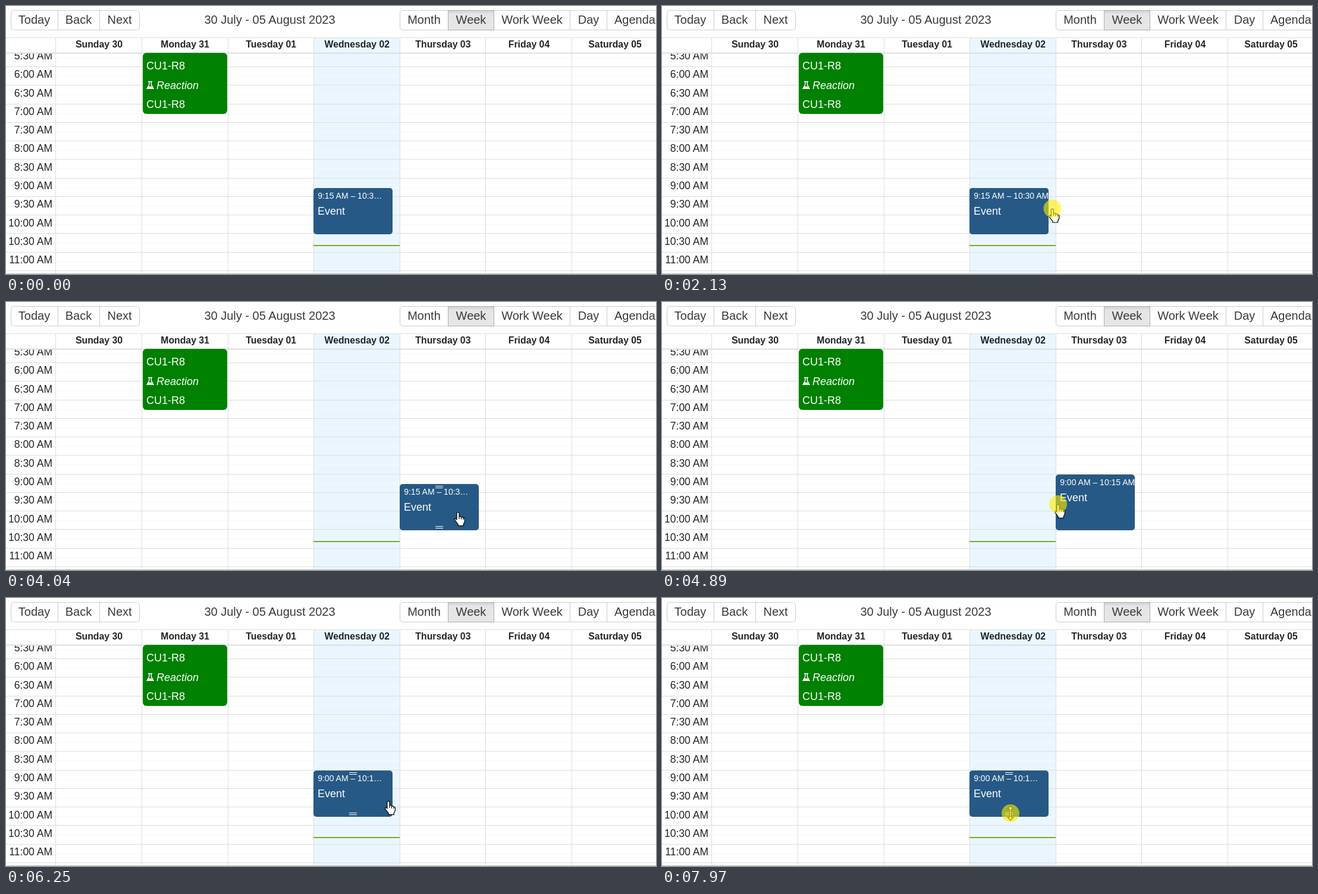
Animation, 1093 px wide and 452 px high, one loop 8 s. Source, as an HTML page:

```html
<!DOCTYPE html>
<html lang="en">
<head>
<meta charset="utf-8">
<title>Week calendar</title>
<style>
  html, body { margin: 0; width: 100%; height: 100%; overflow: hidden; background: #fff; }
  svg { display: block; }
  text { font-family: "Liberation Sans", Arial, sans-serif; white-space: pre; }
  .tool { font-size: 20px; fill: #373a3c; text-anchor: middle; }
  .head { font-size: 15.8px; font-weight: bold; fill: #212529; text-anchor: middle; }
  .hour { font-size: 17.5px; fill: #212529; text-anchor: end; }
  .title { font-size: 18px; fill: #fff; }
  .time { font-size: 14px; fill: #fff; }
  .cursor path { fill: #fff; stroke: #000; stroke-width: 1.2; stroke-linejoin: round; }
</style>
</head>
<body>
<svg id="stage" width="1093" height="452" viewBox="0 0 1093 452">
  <g id="grid"></g>
  <g id="header"></g>
  <g id="toolbar"></g>

  <g>
    <rect x="230" y="79" width="142" height="103" rx="6" fill="#008000"/>
    <text class="title" x="236" y="107">CU1-R8</text>
    <path d="M239 127.5h7M240.7 128v4.5l-3.7 6.7h11l-3.7-6.7v-4.5" fill="none" stroke="#fff" stroke-width="1.4"/>
    <path d="M239.3 135.5h6.4l2.3 4h-11z" fill="#fff"/>
    <text class="title" x="253" y="140" font-style="italic">Reaction</text>
    <text class="title" x="236" y="172">CU1-R8</text>
  </g>

  <svg id="booked" class="event" width="133" height="78"></svg>
  <svg id="preview" class="event" width="133" height="78"></svg>

  <g id="pointer" class="cursor">
    <g id="arrow"><path d="M0 0V17L4 13.5L6.5 19.5L9 18.5L6.5 12.5H12Z"/></g>
    <g id="hand">
      <path d="M-2 2.5Q-2 .6 0 .6Q2 .6 2 2.5V8Q4.8 7 5.5 9.2Q8.2 8 9 10.4Q11.4 9.6 11.4 12.5V16.5L9.3 20.5V23.4H.3V21L-5 14.2Q-6.2 11.3 -3.8 11.4L-2 13.2Z"/>
      <path d="M2 8V12M5.5 9.2V12.8M9 10.4V13.2"/>
    </g>
    <g id="resize"><path d="M0 -12L5 -7H1.3V7H5L0 12L-5 7H-1.3V-7H-5Z"/></g>
    <circle id="press" r="15" fill="#ffee00" fill-opacity=".6"/>
  </g>
</svg>
<script>
const LOOP = 8000;
const $ = id => document.getElementById(id);
const columnX = i => Math.round(83.3 + 144.6 * i);
const rect = (x, y, w, h, fill, extra = '') =>
  `<rect x="${x}" y="${y}" width="${w}" height="${h}" fill="${fill}" ${extra}/>`;
const text = (cls, x, y, s) => `<text class="${cls}" x="${x}" y="${y}">${s}</text>`;

function drawGrid() {
  let out = rect(518, 80, 144, 372, '#eaf6ff');
  for (let i = -1; i < 12; i++) {
    const y = Math.round(102 + 31.27 * i);
    out += rect(84, y + 16, 1009, 1, '#f7f7f7') + rect(0, y, 1093, 1, '#ddd');
    const minutes = 360 + 30 * i, hour = Math.floor(minutes / 60);
    if (i < 11) out += text('hour', 78, 121.2 + 31.3 * i, `${hour}:${minutes % 60 ? '30' : '00'} AM`);
  }
  $('grid').innerHTML = out;
}

function drawHeader() {
  const days = ['Sunday 30', 'Monday 31', 'Tuesday 01', 'Wednesday 02', 'Thursday 03', 'Friday 04', 'Saturday 05'];
  let out = rect(0, 0, 1093, 79, '#fff') + rect(518, 54, 144, 25, '#eaf6ff');
  days.forEach((day, i) => {
    out += rect(columnX(i), 54, 1, 398, '#ddd') + text('head', 156.5 + 144.6 * i, 70, day);
  });
  out += rect(0, 53, 1093, 1, '#ddd') + rect(0, 78.5, 1093, 2, '#ddd');
  out += rect(517, 403, 145, 2, '#74ad31') + rect(0, 451, 1093, 1, '#bbb');
  $('header').innerHTML = out;
}

function drawToolbar() {
  const frame = (x, w) => rect(x + .5, 7.5, w, 33, '#fff', 'rx="5" stroke="#ccc"');
  let out = `<linearGradient id="inset" x2="0" y2="1">
    <stop stop-color="#d0d0d0"/><stop offset=".2" stop-color="#e6e6e6"/></linearGradient>`;
  out += frame(8, 216) + frame(662, 450);
  out += [87, 157, 948, 1010].map(x => rect(x, 8, 1, 32, '#ccc')).join('');
  out += rect(743.5, 7.5, 77, 33, 'url(#inset)', 'stroke="#adadad"');
  const labels = { Today: 47.5, Back: 122, Next: 191, '30 July - 05 August 2023': 443.5, Month: 703,
    Week: 782, 'Work Week': 884.5, Day: 979.5, Agenda: 1057.5 };
  for (const [label, x] of Object.entries(labels)) out += text('tool', x, 30, label);
  $('toolbar').innerHTML = out;
}

function drawEvents() {
  const grip = y => rect(60, y, 13, 1, '#fff') + rect(60, y + 3, 13, 1, '#fff');
  document.querySelectorAll('.event').forEach(el => {
    el.innerHTML = rect(0, 0, 133, 78, '#265985', 'rx="5"') + text('time', 7.2, 18.3, '') +
      text('title', 7, 45, 'Event') + `<g class="grips">${grip(3)}${grip(71)}</g>`;
  });
}

const show = (el, on) => { el.style.display = on ? '' : 'none'; };

function placeEvent(id, column, top, label, grips) {
  const el = $(id);
  el.setAttribute('x', columnX(column));
  el.setAttribute('y', top);
  el.querySelector('.time').textContent = label;
  show(el.querySelector('.grips'), grips);
}

// Pointer moves: start, end, number of steps, destination x, y
const moves = [
  [280, 590, 6, 524, 397], [650, 970, 6, 578, 341], [1160, 1160, 1, 577, 340],
  [1850, 2250, 7, 676, 342],
  [3520, 3640, 3, 761, 356], [4040, 4040, 1, 760, 354], [4100, 4220, 3, 751, 346],
  [4560, 4890, 6, 666, 341], [4950, 5070, 3, 643, 342],
  [6530, 6860, 6, 584, 361], [7050, 7050, 1, 586, 364], [7110, 7110, 1, 584, 366],
  [7170, 7170, 1, 582, 367], [7570, 7570, 1, 586, 364], [7630, 7630, 1, 586, 363]
];

function pointerAt(t) {
  let x = 574, y = 444;
  for (const [start, end, steps, toX, toY] of moves) {
    if (t < start) break;
    const progress = end > start ? Math.min(1, (t - start) / (end - start)) : 1;
    const p = (Math.floor(progress * (steps - 1) + 1e-6) + 1) / steps;
    const eased = p * p * (3 - 2 * p);
    x += (toX - x) * eased;
    y += (toY - y) * eased;
  }
  return { x, y };
}

const within = (t, a, b) => t >= a && t < b;

function render(t) {
  const { x, y } = pointerAt(t);
  const firstDrag = within(t, 1850, 2780), secondDrag = within(t, 4560, 6250);
  const dragging = firstDrag || secondDrag;
  const hovered = t >= 280 && y < 385 && !dragging && !within(t, 2780, 2840);

  const late = t >= 6250;
  placeEvent('booked', within(t, 2780, 6250) ? 4 : 3, late ? 291 : 307,
    late ? '9:00 AM – 10:1…' : '9:15 AM – 10:3…', hovered);

  show($('preview'), dragging);
  placeEvent('preview', x > 662 ? 4 : 3, firstDrag ? 307 : 291,
    firstDrag ? '9:15 AM – 10:30 AM' : '9:00 AM – 10:15 AM', false);

  const resizing = within(t, 7050, 7110) || t >= 7570;
  show($('pointer'), t >= 280);
  $('pointer').setAttribute('transform', `translate(${x.toFixed(1)} ${y.toFixed(1)})`);
  show($('resize'), resizing);
  show($('hand'), !resizing && y < 385);
  show($('arrow'), y >= 385);
  show($('press'), within(t, 1320, 2780) || within(t, 4500, 6250) || t >= 7970);
}

function tick() {
  render(performance.now() % LOOP);
  requestAnimationFrame(tick);
}

drawGrid();
drawHeader();
drawToolbar();
drawEvents();
tick();
</script>
</body>
</html>
```
